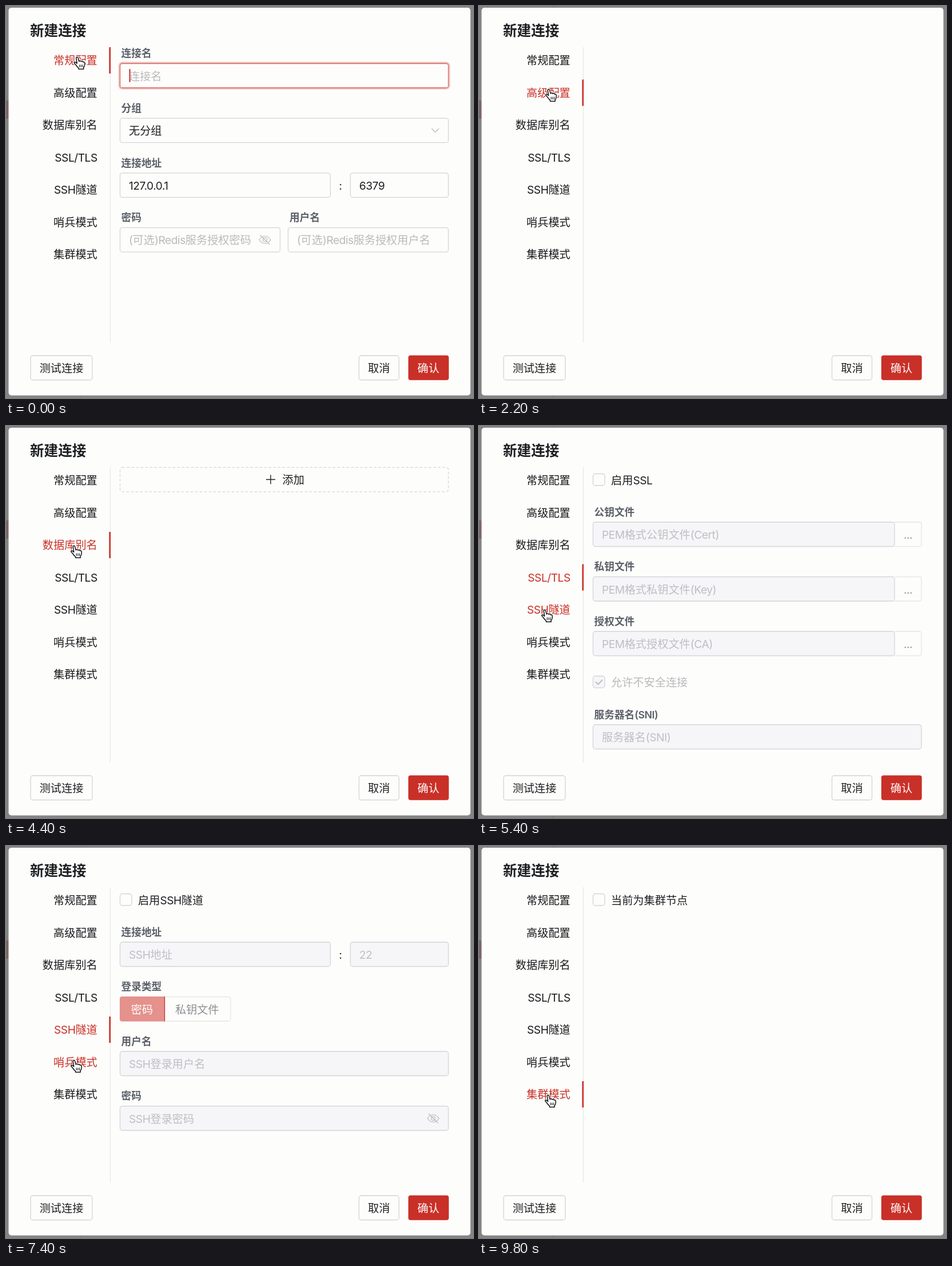
Animation of 817 by 685 pixels, one loop 10 s. Source, as an HTML page:

```html
<!DOCTYPE html>
<html lang="zh-CN">
<head>
<meta charset="utf-8">
<title>新建连接</title>
<style>
  html, body { margin: 0; width: 100%; height: 100%; overflow: hidden; background: #848484; }
  svg { display: block; width: 817px; height: 685px; }
  text { font: 400 19.2px Inter, "Noto Sans CJK SC", "Noto Sans CJK", sans-serif; white-space: pre; }
  .latin { letter-spacing: -.025em; }
  .title { font-size: 24.6px; font-weight: 700; }
  .label { font-size: 17.7px; font-weight: 600; }
</style>
</head>
<body>
<svg id="stage" viewBox="0 0 817 685"></svg>
<script>
const LOOP = 10000, STEP = 200;
const RED = '#c93028', INK = '#1d1f22', SLATE = '#5b6069', HINT = '#bababc', FADED = '#bfbfc3';
const LINE = '#d5d5da', PALE = '#e6e6ea', GREY_FILL = '#f6f6f9', PAPER = '#fdfdfb';

const TABS = ['常规配置', '高级配置', '数据库别名', 'SSL/TLS', 'SSH隧道', '哨兵模式', '集群模式'];
const TAB_Y = 95, TAB_GAP = 56.5;
const CLICKS = [0, 1600, 3200, 4800, 5800, 7600, 9200];

// time, x, y of the pointer
const PATH = [
  [0, 128.5, 99], [600, 128.5, 99], [1200, 126, 153], [1400, 126, 154], [2800, 126, 156],
  [3200, 123, 219], [4400, 123, 219], [4800, 121, 274], [5000, 120, 284], [5400, 119, 331],
  [6800, 119, 333], [7200, 123, 381], [7400, 123, 384], [8200, 123, 386],
  [8600, 124, 439], [8800, 124, 443], [9200, 124, 443], [9800, 125, 445]
];

const esc = s => s.replace(/&/g, '&amp;').replace(/</g, '&lt;').replace(/>/g, '&gt;');

// cy is the visual middle of the line
function text(x, cy, str, fill = INK, { cls = '', anchor = 'start', size = 19.2 } = {}) {
  const runs = str.split(/([\x20-\x7e]+)/).filter(Boolean)
    .map(r => /^[\x20-\x7e]/.test(r) ? `<tspan class="latin">${esc(r)}</tspan>` : r).join('');
  return `<text x="${x}" y="${cy + size * .365}" fill="${fill}" class="${cls}" text-anchor="${anchor}">${runs}</text>`;
}
const label = (x, cy, str) => text(x, cy, str, SLATE, { cls: 'label', size: 17.7 });
const middle = (x, cy, str, fill) => text(x, cy, str, fill, { anchor: 'middle' });

function box(x, y, right, { h = 42.5, fill = 'none', stroke = LINE, extra = '' } = {}) {
  return `<rect x="${x}" y="${y}" width="${right - x}" height="${h}" rx="4" fill="${fill}" stroke="${stroke}" stroke-width="1.3" ${extra}/>`;
}
const stroke = (d, color, w = 1.4) =>
  `<path d="${d}" fill="none" stroke="${color}" stroke-width="${w}" stroke-linecap="round" stroke-linejoin="round"/>`;
const field = (x, y, right, str, color = INK) => box(x, y, right) + text(x + 15.5, y + 22, str, color);
const locked = (x, y, right, str) =>
  box(x, y, right, { fill: GREY_FILL }) + text(x + 15.5, y + 22, str, FADED);
const chevron = (x, y) => stroke(`M${x - 6} ${y - 3}l6 6 6-6`, '#bdbdc2');
const eye = (x, y) => stroke(
  `M${x - 10} ${y}q4-6.5 10-6.5t10 6.5q-4 6.5-10 6.5t-10-6.5M${x - 3.5} ${y}a3.5 3.5 0 1 1 7 0a3.5 3.5 0 1 1-7 0M${x - 8} ${y - 8}l16 16`,
  '#b9b9be', 1.2);
const check = (y, str, color = INK, fill = 'none') =>
  box(199.5, y, 220, { h: 20.5, fill }) + text(231, y + 11, str, color);

// button glued to the right side of a locked field
const addon = (x, y, str) =>
  `<path d="M${x} ${y}H770q4 0 4 4v34.5q0 4-4 4H${x}" fill="none" stroke="${PALE}" stroke-width="1.3"/>` +
  middle((x + 774) / 2, y + 22, str, '#8f9095');
const fileRow = (y, name, hint) =>
  label(201.5, y - 17.5, name) + locked(199.5, y, 727, hint) + addon(727, y, '...');

const pages = [
  label(201.5, 83, '连接名') +
    `<rect x="197.8" y="98.8" width="577.9" height="45.9" rx="5.5" fill="none" stroke="${RED}" stroke-opacity=".25" stroke-width="2.7"/>` +
    box(199.5, 100.5, 774, { stroke: '#d4605b', fill: PAPER }) + text(215, 122.5, '连接名', HINT) +
    `<rect id="caret" x="215.5" y="110" width="2" height="23" fill="${RED}"/>` +
    label(201.5, 179, '分组') + field(199.5, 196.2, 774, '无分组') + chevron(751, 217.5) +
    label(201.5, 274.5, '连接地址') + field(199.5, 291.8, 567.5, '127.0.0.1') +
    middle(585, 314, ':', INK) + field(602.5, 291.8, 774, '6379') +
    label(201.5, 370, '密码') + field(199.5, 387.3, 479.5, '(可选)Redis服务授权密码', HINT) + eye(453, 408.5) +
    label(496, 370, '用户名') + field(493.5, 387.3, 774, '(可选)Redis服务授权用户名', HINT),

  '',

  box(199.5, 72.3, 774, { extra: 'stroke-dasharray="4.5 3.5"' }) +
    stroke('M455.5 93.5h15M463 86v15', INK) + text(483.5, 94, '添加'),

  check(83.5, '启用SSL') +
    fileRow(168, '公钥文件', 'PEM格式公钥文件(Cert)') +
    fileRow(263.5, '私钥文件', 'PEM格式私钥文件(Key)') +
    fileRow(359, '授权文件', 'PEM格式授权文件(CA)') +
    check(437, '允许不安全连接', '#b9b9bd', GREY_FILL) + stroke('M204.5 447.5l4 4 7-7.5', '#bcbcc2', 2) +
    label(201.5, 504.5, '服务器名(SNI)') + locked(199.5, 522, 774, '服务器名(SNI)'),

  check(83.5, '启用SSH隧道') +
    label(201.5, 150.5, '连接地址') + locked(199.5, 168, 567.5, 'SSH地址') +
    middle(585, 190, ':', INK) + locked(602.5, 168, 774, '22') +
    label(201.5, 246, '登录类型') + box(199.5, 263.5, 393, { stroke: PALE }) +
    '<path d="M277 263v43.5H203q-4 0-4-4V267q0-4 4-4z" fill="#e5918c"/>' +
    `<path d="M277.5 263v43.5" stroke="${RED}" stroke-width="1.3"/>` +
    middle(238, 286, '密码', '#fff') + text(296, 286, '私钥文件', '#8f9095') +
    label(201.5, 341.5, '用户名') + locked(199.5, 359, 774, 'SSH登录用户名') +
    label(201.5, 437, '密码') + locked(199.5, 454.5, 774, 'SSH登录密码') + eye(747.5, 476),

  check(83.5, '当前为哨兵节点') +
    label(201.5, 150.5, '主节点组名') + locked(199.5, 168, 628, 'mymaster') + chevron(604.5, 189) +
    addon(628, 168, '自动查询组名') +
    label(201.5, 246, '主节点密码') + locked(199.5, 263.5, 774, '(可选)主节点服务授权用户名') + eye(747.5, 285) +
    label(201.5, 341.5, '主节点用户名') + locked(199.5, 359, 774, '(可选)主节点服务授权密码 (Redis > 6.0)'),

  check(83.5, '当前为集群节点')
];

const HAND = 'M5 2.4Q5 .8 6.6 .8Q8 .8 8.4 2.4L10 8.2q.6-1.2 2-1q1.4.2 1.7 1.4q.9-1 2.1-.6q1.2.4 1.4 1.6' +
  'q1.2-.6 2.1.2q.9.8.8 2.6q0 3-1 5L18 19v2.8H9.5L9 19.6Q6 17 4.2 14Q1.5 11.5 1.5 10.5Q2 9 3.8 9.6L6.5 11.8z';

const stage = document.getElementById('stage');
stage.innerHTML =
  '<rect width="817" height="685" fill="#848484"/>' +
  '<path d="M129.5 0v685" stroke="#777"/><rect y="165" width="6" height="32" fill="#7c6766"/>' +
  `<rect x="4.5" y="3" width="808" height="677.5" rx="5" fill="${PAPER}"/>` +
  text(42, 43.5, '新建连接', INK, { cls: 'title', size: 24.6 }) +
  '<path d="M182.5 72v516" stroke="#e6e6f0" stroke-width="1.3"/>' +
  TABS.map((name, i) => text(159.8, TAB_Y + i * TAB_GAP, name, INK, { cls: 'tab', anchor: 'end' })).join('') +
  `<rect id="bar" x="180.4" y="72" width="2.7" height="46" fill="${RED}"/>` +
  pages.map(p => `<g class="page">${p}</g>`).join('') +
  box(43, 611, 151) + middle(97, 632.5, '测试连接', INK) +
  box(617.5, 611, 687.5) + middle(652.5, 632.5, '取消', INK) +
  `<rect x="703.8" y="610.4" width="70.9" height="43.3" rx="4" fill="${RED}"/>` + middle(739, 632.5, '确认', '#fff') +
  `<g id="hand" stroke-linejoin="round"><path d="${HAND}" fill="none" stroke="#fff" stroke-width="3.4"/>` +
  `<path d="${HAND}" fill="#fff" stroke="#111" stroke-width="1.5"/>` +
  '<path d="M11 14v4.5M13.7 14v4.5M16.4 14v4.5" stroke="#111" stroke-width="1.1"/></g>';

const [bar, caret, hand] = ['bar', 'caret', 'hand'].map(id => document.getElementById(id));
const tabs = [...stage.querySelectorAll('.tab')];
const panes = [...stage.querySelectorAll('.page')];

const selected = t => CLICKS.filter(c => c <= t).length - 1;

function pointer(t) {
  const next = PATH.findIndex(p => p[0] > t);
  if (next < 0) return PATH[PATH.length - 1].slice(1);
  const a = PATH[next - 1], b = PATH[next];
  const u = (t - a[0]) / (b[0] - a[0]), k = u * u * (3 - 2 * u);
  return [1, 2].map(i => a[i] + (b[i] - a[i]) * k);
}

const hovered = t => Math.round((pointer(t)[1] - 10 - TAB_Y) / TAB_GAP);
const lit = (i, t) => selected(t) === i || hovered(t) === i ? 1 : 0;

function render(t) {
  const sel = selected(t), [x, y] = pointer(t), before = Math.max(0, t - STEP);
  tabs.forEach((tab, i) => {
    const k = .88 * lit(i, t) + .12 * lit(i, before);
    const mix = (a, b) => Math.round(a + (b - a) * k);
    tab.setAttribute('fill', `rgb(${mix(24, 201)},${mix(25, 48)},${mix(28, 40)})`);
  });
  panes.forEach((p, i) => p.style.display = i === sel ? '' : 'none');
  bar.setAttribute('y', 72 + sel * TAB_GAP);
  caret.style.display = t % 1000 < 500 ? '' : 'none';
  hand.setAttribute('transform', `translate(${x - 10.8} ${y - 10.5})`);
}

const start = performance.now();
function tick() {
  const t = (performance.now() - start) % LOOP;
  render(Math.floor(t / STEP) * STEP);
  requestAnimationFrame(tick);
}
tick();
</script>
</body>
</html>
```
